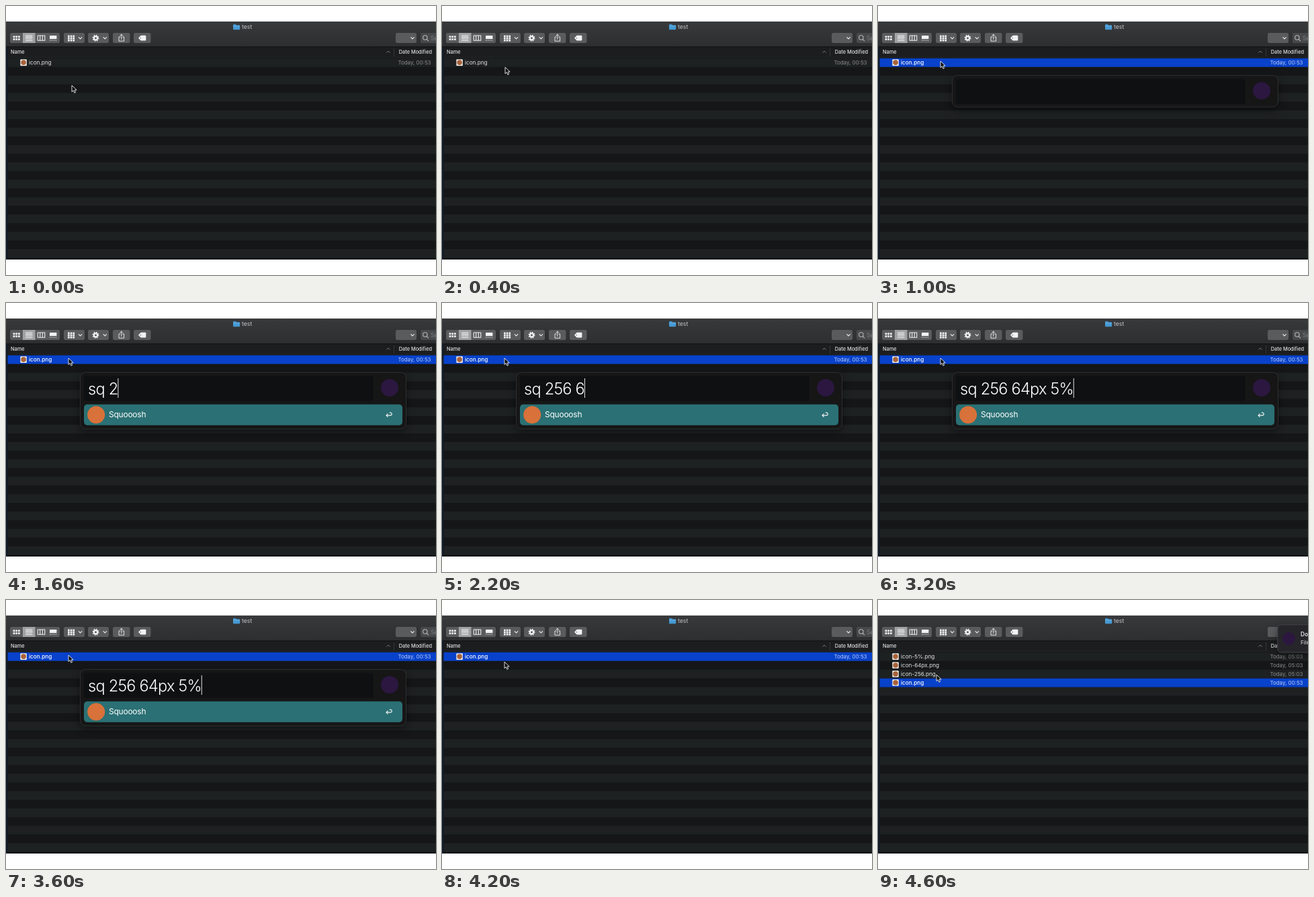
Write an HTML page that moves like this. It is 640 by 400 pixels and loops after 4800 ms.

```html
<!DOCTYPE html>
<html lang="en">
<head>
<meta charset="utf-8">
<title>File window</title>
<style>
html, body { margin: 0; width: 100%; height: 100%; overflow: hidden; background: #fff; }
svg { display: block; width: 640px; height: 400px; }
text { font-family: Inter, "Liberation Sans", sans-serif; fill: #e1e2e2; }
.row { font-size: 8.2px; }
.row .date { font-size: 7.95px; fill: #8b8d8e; }
.head { font-size: 7.35px; font-weight: 500; }
.btn { fill: #5a5b5d; }
.ico { fill: #f2f2f2; }
.line { fill: none; stroke: #f2f2f2; stroke-width: 1.1; stroke-linecap: round; stroke-linejoin: round; }
.query { font-size: 23.6px; font-weight: 300; letter-spacing: -.033em; fill: #fff; }
.title { font-size: 12px; letter-spacing: -.02em; fill: #fff; }

/* Every change is a hard cut on a 200 ms grid. */
.anim { animation: 4.8s step-end infinite; }
#pointer { animation-name: point; }
#selection { animation-name: select; }
#main { animation-name: shift; }
#main text { animation-name: weight; }
#main .date { animation-name: dateTint; }
#added { animation-name: add; }
#popup { animation-name: popup; }
#panel { animation-name: grow; }
#result { animation-name: result; }
#note { animation-name: note; }

@keyframes point {
  0% { transform: translate(98px, 118px); }
  4.16% { transform: translate(97px, 112px); }
  8.33% { transform: translate(94px, 91px); }
  12.5% { transform: translate(93px, 82px); }
  87.5% { transform: translate(93px, 92px); }
  91.66% { transform: translate(91px, 102px); }
  95.83% { transform: translate(87px, 111px); }
}
@keyframes select { 0% { opacity: 0; } 16.66%, 100% { opacity: 1; } }
@keyframes shift { 0% { transform: none; } 91.66%, 100% { transform: translateY(38.8px); } }
@keyframes weight { 0% { font-weight: 400; } 16.66%, 100% { font-weight: 500; fill: #fff; } }
@keyframes dateTint { 0% { fill: #8b8d8e; } 16.66%, 100% { fill: #bccdf4; } }
@keyframes add { 0% { visibility: hidden; } 91.66%, 100% { visibility: visible; } }
@keyframes popup { 0% { visibility: hidden; } 20.83% { visibility: visible; } 83.33%, 100% { visibility: hidden; } }
@keyframes grow { 0% { height: 47px; } 29.16%, 100% { height: 84px; } }
@keyframes result { 0% { opacity: 0; } 29.16%, 100% { opacity: 1; } }
@keyframes note { 0% { visibility: hidden; } 95.83%, 100% { visibility: visible; } }
</style>
</head>
<body>
<svg viewBox="0 0 640 400">
  <defs>
    <linearGradient id="bar" x2="0" y2="1">
      <stop stop-color="#38393b"/><stop offset="1" stop-color="#2d2e30"/>
    </linearGradient>
    <pattern id="stripes" y="77.8" width="640" height="25.8" patternUnits="userSpaceOnUse">
      <rect width="640" height="25.8" fill="#141617"/>
      <rect width="640" height="12.9" fill="#1e2122"/>
    </pattern>
    <filter id="shadow" x="-10%" y="-30%" width="120%" height="180%">
      <feDropShadow dx="0" dy="4" stdDeviation="6" flood-color="#000" flood-opacity=".45"/>
    </filter>
    <g id="thumb">
      <rect x="21.3" y="79.3" width="9.6" height="9.6" rx="1" fill="#e9e7e4"/>
      <circle cx="26.1" cy="84.1" r="3.8" fill="#a8623a"/>
    </g>
    <path id="down" class="line" d="M-2.3-1.1 0 1.2 2.3-1.1"/>
    <g id="tiles" class="ico">
      <rect width="2.7" height="2.7"/><rect x="3.7" width="2.7" height="2.7"/><rect x="7.4" width="2.7" height="2.7"/>
    </g>
  </defs>

  <!-- Window -->
  <rect y="23" width="640" height="354" fill="#141617"/>
  <rect y="77.8" width="640" height="299.2" fill="url(#stripes)"/>
  <rect y="23" width="640" height="38" fill="url(#bar)"/>
  <rect y="23" width="640" height="1" fill="#47484a"/>
  <rect y="61" width="640" height="15.5" fill="#1b1d1e"/>
  <path d="M0 60.8H640" stroke="#0d0e0f"/>
  <path d="M0 76.6H640" stroke="#2b2d2e" stroke-width=".7"/>
  <path d="M577.5 63V75" stroke="#3c3e3f" stroke-width=".8"/>
  <rect y="61" width="2.5" height="316" fill="#111a28"/>

  <path d="M338 28.2q0-1 1-1h3l1.2 1.2h4q1 0 1 1v4.8q0 1-1 1h-8.2q-1 0-1-1z" fill="#4599d3"/>
  <path d="M338 30h10.2" stroke="#79bee9" stroke-width=".7"/>
  <text x="351" y="34.2" font-size="8.7" style="fill:#c4c5c6">test</text>

  <!-- Toolbar -->
  <g class="btn">
    <rect x="6" y="40" width="74" height="15" rx="2.5"/>
    <rect x="86" y="40" width="31" height="15" rx="2.5"/>
    <rect x="122" y="40" width="31" height="15" rx="2.5"/>
    <rect x="159" y="40" width="25.5" height="15" rx="2.5"/>
    <rect x="190" y="40" width="25.5" height="15" rx="2.5"/>
    <rect x="580" y="40" width="31" height="15" rx="2.5"/>
  </g>
  <rect x="25" y="40" width="18.5" height="15" fill="#a1a2a3"/>
  <use href="#tiles" x="10.6" y="44.4"/><use href="#tiles" x="10.6" y="48.2"/>
  <path class="line" d="M29.5 44h9.5m-9.5 2.4h9.5m-9.5 2.4h9.5m-9.5 2.4h9.5"/>
  <path class="line" stroke-width=".9" d="M47.2 44h10.6v7.3H47.2zm3.5 0v7.3m3.6-7.3v7.3"/>
  <rect class="ico" x="65" y="44" width="10.4" height="5" rx=".6"/>
  <path class="line" stroke-dasharray="1.4 1.5" style="stroke-linecap:butt" d="M65 51h10.4"/>
  <use href="#tiles" x="92" y="43.6"/><use href="#tiles" x="92" y="46.7"/><use href="#tiles" x="92" y="49.8"/>
  <use href="#down" x="110.5" y="47.7"/>
  <g fill="none" stroke="#f2f2f2">
    <circle cx="133.5" cy="47.7" r="2.6" stroke-width="2.2"/>
    <circle cx="133.5" cy="47.7" r="4.2" stroke-width="1.6" stroke-dasharray="1.65 1.65"/>
  </g>
  <use href="#down" x="147.3" y="47.7"/>
  <path class="line" style="stroke-width:.9" d="M169.8 46h-1.8v6.2h7.6V46h-1.8m-2 3.4v-7.2m-1.9 1.9 1.9-1.9 1.9 1.9"/>
  <path class="ico" d="M197 47.7 200.2 44.3q.5-.5 1.2-.5h5.6q1.4 0 1.4 1.4v5q0 1.4-1.4 1.4h-5.6q-.7 0-1.2-.5z"/>
  <circle cx="200.3" cy="47.7" r=".7" fill="#5a5b5d"/>
  <use href="#down" x="605" y="47.7"/>
  <rect x="617" y="40" width="40" height="15" rx="2.5" fill="#48494b"/>
  <path class="line" style="stroke:#b5b6b7" d="M626.2 49.4l2.4 2.5M627 47a3.2 3.2 0 1 1-6.4 0a3.2 3.2 0 1 1 6.4 0"/>
  <text x="632" y="50.8" font-size="8.4" style="fill:#7d7e80">Search</text>

  <!-- List -->
  <text class="head" x="7" y="71">Name</text>
  <path class="line" style="stroke:#8c8e8f;stroke-width:.8" d="M566.6 69.3 569 67l2.4 2.3"/>
  <text class="head" x="584.8" y="71">Date Modified</text>
  <g id="added" class="anim"></g>
  <g id="main" class="anim row">
    <rect id="selection" class="anim" x="2.5" y="77.8" width="637.5" height="12.8" fill="#0842cb"/>
    <use href="#thumb"/>
    <text class="anim" x="34" y="87">icon.png</text>
    <text class="anim date" x="583.5" y="87">Today, 00:53</text>
  </g>

  <!-- Launcher -->
  <g id="popup" class="anim">
    <rect id="panel" class="anim" x="110.5" y="103.2" width="485" height="84" rx="8" fill="#141518" stroke="#343538" stroke-width=".8" filter="url(#shadow)"/>
    <rect x="116" y="108.5" width="431" height="37" rx="3" fill="#0f1012"/>
    <circle cx="571" cy="126" r="13" fill="#2b1740"/>
    <text id="query" class="query" x="122" y="136"></text>
    <rect id="caret" y="112" width="1" height="29" fill="#e4e4e4"/>
    <g id="result" class="anim">
      <rect x="116" y="150.8" width="474" height="31" rx="5" fill="#2a7074"/>
      <circle cx="134.2" cy="166.3" r="13" fill="#d8713a"/>
      <text class="title" x="153" y="170.4">Squooosh</text>
      <path class="line" d="M568.2 164.8l-2.3 2.3 2.3 2.3m-2.3-2.3h6.2q2.2 0 2.2-2t-2.2-2h-1"/>
    </g>
  </g>

  <!-- Notification -->
  <g id="note" class="anim">
    <rect x="594.8" y="36.8" width="220" height="41" rx="5" fill="#252629" stroke="#48494c" stroke-width=".8" filter="url(#shadow)"/>
    <circle cx="611.5" cy="57.5" r="9.5" fill="#2b1740"/>
    <text x="629" y="54" font-size="8.3" font-weight="600">Done</text>
    <text x="629" y="66.4" font-size="8.1">Files ready</text>
  </g>

  <g id="pointer" class="anim">
    <path d="M0 0V9.6L2.3 7.5 3.9 11.2 5.6 10.4 4.1 6.9H7.2Z" fill="#08090a" stroke="#f4f4f4" stroke-width=".9" stroke-linejoin="round"/>
  </g>
  <path d="M0 377H640V400H0Z" fill="#fff"/>
</svg>
<script>
const LOOP = 4800;
const PHRASE = "sq 256 64px 5%".replaceAll(" ", "\u00a0");
// [time in ms, characters typed]
const KEYS = [[0, 0], [1200, 1], [1400, 3], [1600, 4], [1800, 5], [2000, 7], [2200, 8],
  [2400, 10], [2600, 12], [3000, 13], [3200, 14]];

const query = document.getElementById("query");
const caret = document.getElementById("caret");

document.getElementById("added").innerHTML = ["5%", "64px", "256"].map((size, i) => `
  <g class="row" transform="translate(0 ${i * 12.9})">
    <use href="#thumb"/>
    <text x="34" y="87">icon-${size}.png</text>
    <text class="date" x="583.5" y="87">Today, 05:03</text>
  </g>`).join("");

let start;
function draw(now) {
  start ??= now;
  const t = (now - start) % LOOP;
  const count = KEYS.findLast(([at]) => at <= t)[1];
  query.textContent = PHRASE.slice(0, count);
  caret.style.opacity = count ? 1 : 0;
  caret.setAttribute("x", 122 + (count ? query.getComputedTextLength() : 0));
  requestAnimationFrame(draw);
}
requestAnimationFrame(draw);
</script>
</body>
</html>
```
